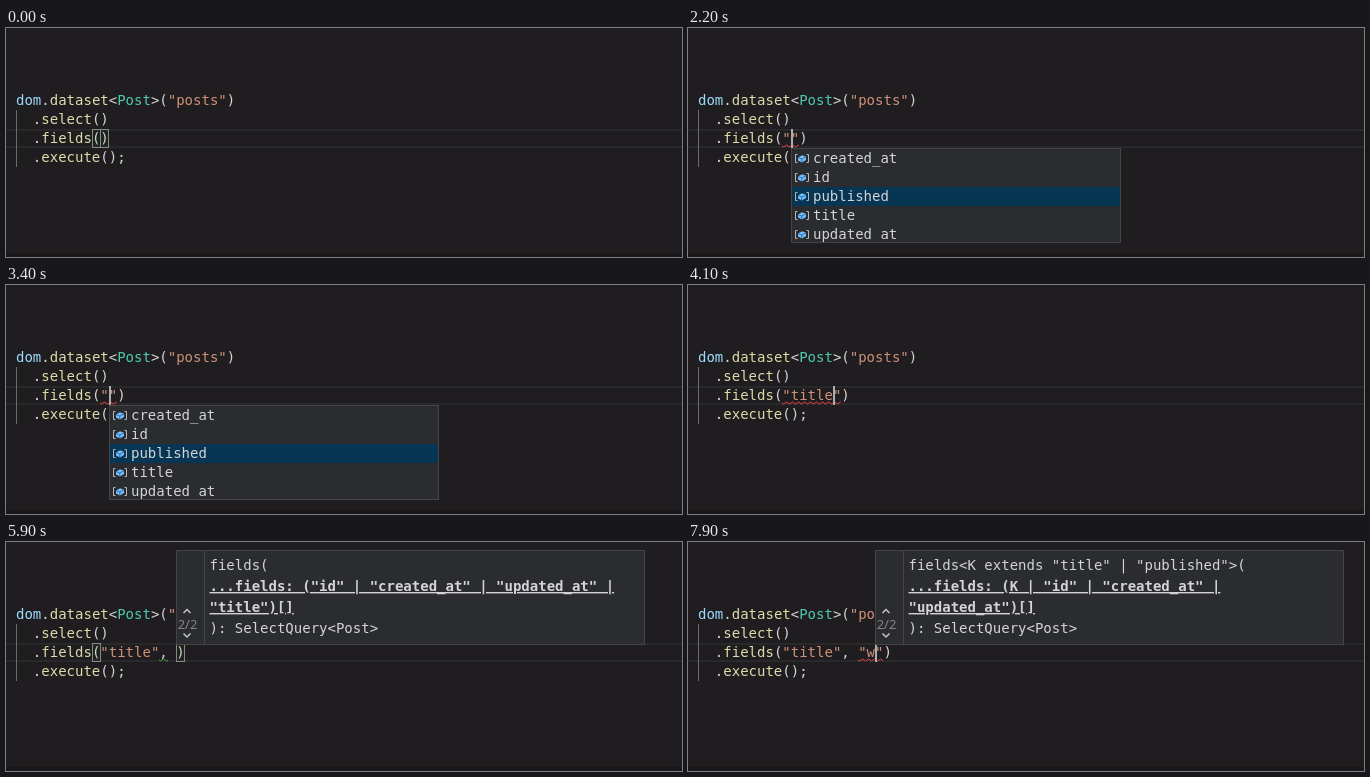
Write an HTML page that moves like this. It is 676 px wide and 229 px high and loops after 8000 ms.

```html
<!DOCTYPE html>
<html lang="en">
<head>
<meta charset="utf-8">
<title>Typed query completion</title>
<style>
  html, body { margin: 0; width: 100%; height: 100%; overflow: hidden; background: #1f1d20; }
  svg { display: block; }
  text { font: 14px "DejaVu Sans Mono", monospace; white-space: pre; fill: #d4d4d4; }
  .variable { fill: #9cdcfe; }
  .method { fill: #dcdcaa; }
  .type { fill: #4ec9b0; }
  .string { fill: #ce9178; }
  .active { font-weight: bold; text-decoration: underline; }
  .count { font: 13px "Noto Sans", sans-serif; fill: #858585; }
  .widget { fill: #2a2c2f; stroke: #454545; }
</style>
</head>
<body>
<svg id="stage" width="676" height="229" viewBox="0 0 676 229">
  <defs>
    <clipPath id="listClip"><rect x="104" y="121" width="328" height="93"/></clipPath>
  </defs>
  <rect width="676" height="229" fill="#1f1d20"/>
  <rect y="225" width="676" height="4" fill="#1a1719"/>
  <path d="M0 102H676M0 119H676" stroke="#29282b" stroke-width="2"/>
  <path d="M10.5 82V139" stroke="#6b6b6b"/>
  <g id="scene"></g>
</svg>
<script>
const LOOP = 8000;
const LEFT = 10, CHAR = 8.428, LINE_TOP = 101, LINE = 19;
const RED = '#ea4646', GREEN = '#4d9e4d';

const fieldNames = ['created_at', 'id', 'published', 'title', 'updated_at'];
const signatures = [
  ['fields(', '...fields: ("id" | "created_at" | "updated_at" |', '"title")[]', '): SelectQuery<Post>'],
  ['fields<K extends "title" | "published">(', '...fields: (K | "id" | "created_at" |', '"updated_at")[]', '): SelectQuery<Post>']
];

// Each entry changes part of the editor state at the given time.
const timeline = [
  [0, { args: '', col: 10, caret: false, match: true, wave: null, pick: -1, sig: -1, sigCol: 19 }],
  [100, { caret: true }],
  [600, { caret: false }],
  [1100, { caret: true }],
  [1200, { args: '""', col: 11 }],
  [1400, { match: false }],
  [1600, { wave: [10, 2, RED] }],
  [1700, { caret: false }],
  [1800, { pick: 2 }],
  [2200, { caret: true }],
  [2500, { pick: 3 }],
  [2700, { caret: false }],
  [2900, { pick: 4 }],
  [3000, { pick: 0 }],
  [3200, { caret: true }],
  [3300, { pick: 1 }],
  [3400, { pick: 2 }],
  [3700, { pick: 3, caret: false }],
  [4100, { pick: -1, args: '"title"', col: 16, caret: true, wave: [10, 7, RED] }],
  [4300, { wave: null }],
  [4500, { caret: false }],
  [4600, { col: 17, caret: true }],
  [5000, { match: true }],
  [5200, { caret: false }],
  [5500, { args: '"title", ', col: 19, caret: true, sig: 0 }],
  [5900, { caret: false, wave: [17, 1, GREEN] }],
  [6400, { args: '"title", ""', col: 20, caret: true }],
  [6500, { sig: 1, sigCol: 20, match: false }],
  [6700, { wave: null }],
  [6800, { wave: [19, 2, RED] }],
  [6900, { caret: false }],
  [7400, { caret: true }],
  [7800, { args: '"title", "w"', col: 21, wave: [19, 3, RED] }],
  [7900, { sigCol: 21 }]
];

const escapeText = s => s.replace(/&/g, '&amp;').replace(/</g, '&lt;').replace(/>/g, '&gt;');
const span = (s, kind) => `<tspan class="${kind}">${escapeText(s)}</tspan>`;
const text = (x, y, content, kind = '') => `<text x="${x}" y="${y}" class="${kind}">${content}</text>`;
const colX = col => Math.round(LEFT + col * CHAR);

function codeLines(args) {
  const quoted = args.replace(/"[^"]*"/g, s => span(s, 'string'));
  const call = (name, inner, end = '') => `  .${span(name, 'method')}(${inner})${end}`;
  return [
    `${span('dom', 'variable')}.${span('dataset', 'method')}&lt;${span('Post', 'type')}&gt;(${span('"posts"', 'string')})`,
    call('select', ''),
    call('fields', quoted),
    call('execute', '', ';')
  ].map((line, i) => text(LEFT, 77 + i * LINE, line)).join('');
}

const bracketBox = col =>
  `<rect x="${colX(col) + .5}" y="${LINE_TOP + .5}" width="8" height="18" fill="#006400" fill-opacity=".1" stroke="#888"/>`;

function squiggle([col, length, color]) {
  const start = colX(col), end = colX(col + length);
  let d = `M${start} 118`;
  for (let x = start, i = 0; x < end; i++) {
    const step = Math.min(i ? 3 : 1.5, end - x);
    x += step;
    d += `l${step} ${(i % 2 ? -1 : 1) * step * .67}`;
  }
  return `<path d="${d}" fill="none" stroke="${color}"/>`;
}

const fieldIcon = y => `<g transform="translate(107 ${y})" fill="none">
  <path d="M2.5 .5H.5V8.5H2.5M11.5 .5H13.5V8.5H11.5" stroke="#b5b8ba"/>
  <path d="M3 3.5L7 1.2L11 2.8V6L7 8.5L3 6.5Z" fill="#75beff"/>
  <path d="M3 3.5L6.8 5L11 2.8M6.8 5V8" stroke="#245b88" stroke-width=".8"/></g>`;

function completionList(pick) {
  const rows = fieldNames.map((name, i) => {
    const y = 121 + i * LINE;
    const highlight = i === pick ? `<rect x="104" y="${y}" width="328" height="${LINE}" fill="#073655"/>` : '';
    return highlight + fieldIcon(y + 5) + text(125, y + 14, name);
  });
  return `<rect class="widget" x="103.5" y="120.5" width="329" height="94"/>
    <g clip-path="url(#listClip)">${rows.join('')}</g>`;
}

function signatureHelp(index, col) {
  const lines = signatures[index].map((line, i) =>
    text(33.5, 20 + i * 21, escapeText(line), i === 1 || i === 2 ? 'active' : ''));
  return `<g transform="translate(${colX(col)} 8)">
    <rect class="widget" x=".5" y=".5" width="468" height="94"/>
    <path d="M28.5 1V94" stroke="#454545"/>
    <path d="M7.5 63L11 59.5L14.5 63M7.5 83.5L11 87L14.5 83.5" fill="none" stroke="#c5c5c5" stroke-width="1.5"/>
    <text class="count" x="11.5" y="79" text-anchor="middle">2/2</text>
    ${lines.join('')}</g>`;
}

function render(s) {
  let out = '';
  if (s.match) out += bracketBox(9) + bracketBox(10 + s.args.length);
  out += codeLines(s.args);
  if (s.wave) out += squiggle(s.wave);
  if (s.caret) out += `<rect x="${colX(s.col)}" y="${LINE_TOP}" width="2" height="${LINE}" fill="#aeafad"/>`;
  if (s.pick >= 0) out += completionList(s.pick);
  if (s.sig >= 0) out += signatureHelp(s.sig, s.sigCol);
  return out;
}

const scene = document.getElementById('scene');
const startTime = performance.now();
let shown = -1;

function update(now) {
  const t = Math.max(0, now - startTime) % LOOP;
  const count = timeline.filter(([at]) => at <= t).length;
  if (count !== shown) {
    shown = count;
    scene.innerHTML = render(Object.assign({}, ...timeline.slice(0, count).map(entry => entry[1])));
  }
  requestAnimationFrame(update);
}
update(startTime);
</script>
</body>
</html>
```
